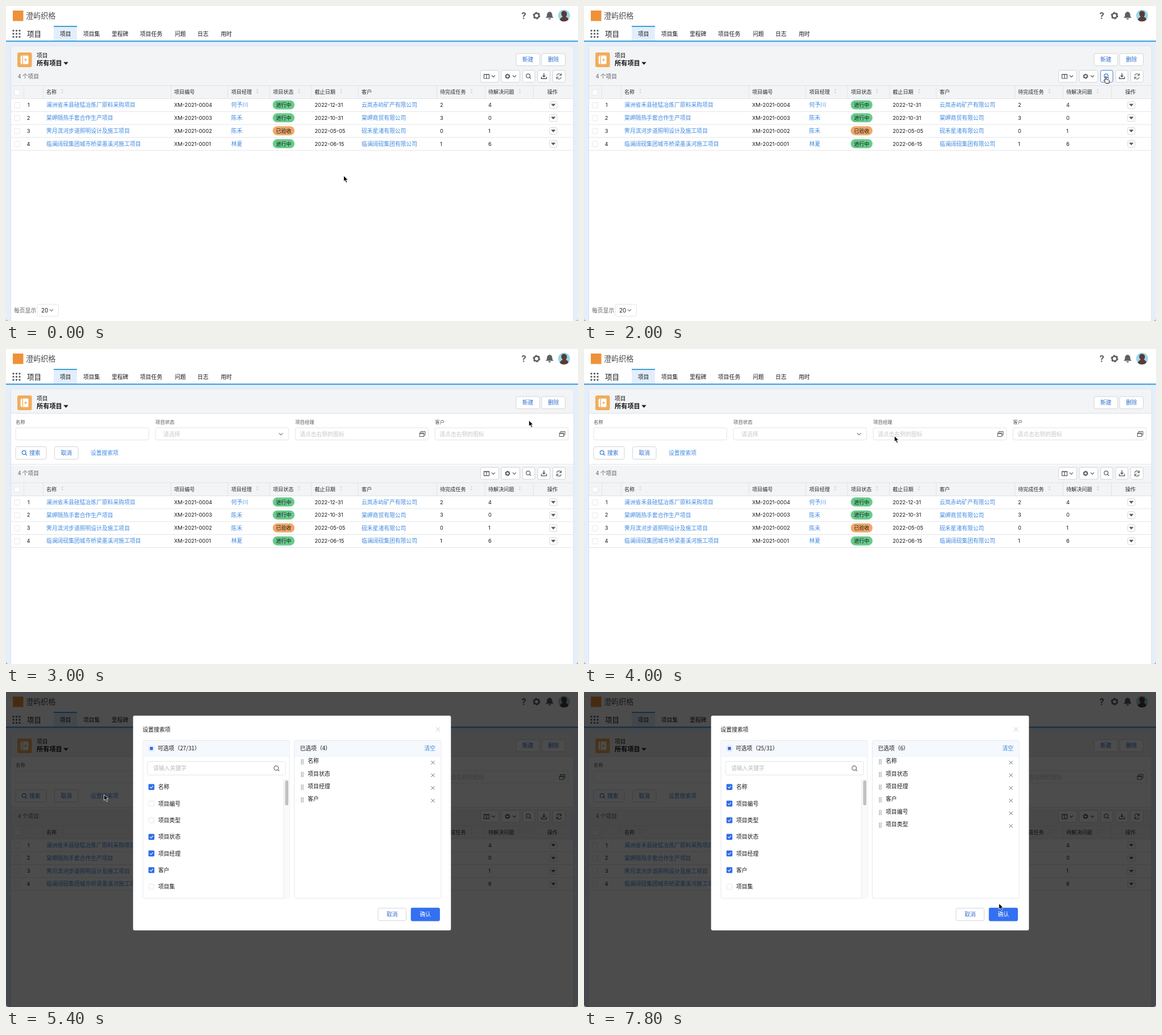
These frames come from a looping animation (1007x556 px, 8 s). An HTML page:

```html
<!DOCTYPE html>
<html lang="zh-CN">
<head>
<meta charset="utf-8">
<title>项目</title>
<style>
  html, body { margin: 0; width: 100%; height: 100%; overflow: hidden; background: #fff; }
  svg { display: block; width: 100vw; height: 100vh; }
  text { font-family: "Noto Sans CJK SC", "Noto Sans CJK", sans-serif; white-space: pre; }
  text.latin { font-family: Inter, "Liberation Sans", sans-serif; }
</style>
</head>
<body>
<svg id="stage" viewBox="0 0 1007 556" preserveAspectRatio="none"></svg>
<script>
const LINK = '#3f8ae0', BLUE = '#2f6fd0', INK = '#181818', LINE = '#dddfe2', GREY = '#585858';
const stage = document.getElementById('stage');

function add(parent, tag, attrs = {}) {
  const node = document.createElementNS('http://www.w3.org/2000/svg', tag);
  for (const key in attrs) node.setAttribute(key, attrs[key]);
  parent.appendChild(node);
  return node;
}
const group = (parent, attrs) => add(parent, 'g', attrs);
const rect = (parent, x, y, width, height, fill, more) =>
  add(parent, 'rect', { x, y, width, height, fill, ...more });
const path = (parent, d, stroke, width = 1, fill = 'none') =>
  add(parent, 'path', { d, stroke, 'stroke-width': width, fill });
const circle = (parent, cx, cy, r, fill, more) => add(parent, 'circle', { cx, cy, r, fill, ...more });
const show = (node, on) => node.setAttribute('display', on ? 'inline' : 'none');

// y is the middle of the line of text
function text(parent, x, y, value, { size = 9.8, fill = INK, weight = 400, anchor = 'start' } = {}) {
  const latin = /^[\x20-\x7e]+$/.test(value);
  const fontSize = latin ? size * 0.94 : size;
  const node = add(parent, 'text', {
    x, y: y + fontSize * 0.38, fill, 'font-size': fontSize, 'font-weight': weight, 'text-anchor': anchor
  });
  if (latin) node.setAttribute('class', 'latin');
  node.textContent = value;
  return node;
}

const frame = (parent, x, y, w, h, stroke = '#cfd1d4', fill = '#fff', rx = 2.8) =>
  rect(parent, x + .5, y + .5, w - 1, h - 1, fill, { stroke, 'stroke-width': .9, rx });

function button(parent, x, y, w, h, label) {
  frame(parent, x, y, w, h);
  text(parent, x + w / 2, y + h / 2, label, { fill: BLUE, anchor: 'middle' });
}
const chevron = (parent, x, y, color = '#555', r = 3) =>
  path(parent, `M${x - r} ${y - r / 2}l${r} ${r} ${r} ${-r}`, color, 1.1);
const cross = (parent, x, y, r, color) =>
  path(parent, `M${x - r} ${y - r}l${2 * r} ${2 * r}m0 ${-2 * r}l${-2 * r} ${2 * r}`, color, .9);
const caret = (parent, x, y, r, color = INK) =>
  path(parent, `M${x - r} ${y - r / 2}h${2 * r}l${-r} ${r * 1.15}z`, color, .5, color);

function lens(parent, x, y, color, r = 3.4) {
  const g = group(parent, { stroke: color, fill: 'none', 'stroke-width': 1.2 });
  circle(g, x - .8, y - .8, r, 'none');
  add(g, 'path', { d: `M${x + r * .7 - .8} ${y + r * .7 - .8}l2.7 2.7` });
}
function gear(parent, x, y, r, color, hole) {
  circle(parent, x, y, r, 'none', { stroke: color, 'stroke-width': r * .65 });
  circle(parent, x, y, r * 1.36, 'none', {
    stroke: color, 'stroke-width': r * .38, 'stroke-dasharray': `${r * .72} ${r * .704}`
  });
  circle(parent, x, y, r * .62, hole);
}
function checkbox(parent, x, y) {
  frame(parent, x - 5.2, y - 5.2, 10.4, 10.4, '#e2e4e8', '#fff', 1.4);
}
function tick(parent, x, y) {
  const g = group(parent);
  rect(g, x - 5.2, y - 5.2, 10.4, 10.4, '#2f6de8', { rx: 1.4 });
  path(g, `M${x - 2.7} ${y}l2 2 3.6 -3.9`, '#fff', 1.1);
  return g;
}

function drawTopBar(g) {
  rect(g, 0, 0, 1007, 556, '#e5effb');
  rect(g, 0, 0, 1007, 62, '#fff');
  rect(g, 12, 8, 18.5, 18.5, '#ef9138');
  text(g, 35, 17, '澄屿织格', { size: 13.1, fill: '#4a4a4a', weight: 500 });

  text(g, 911.5, 17, '?', { size: 16.5, fill: '#5c5f64', weight: 700, anchor: 'middle' });
  gear(g, 934, 17, 4.2, '#5c5f64', '#fff');
  path(g, 'M950.5 20.5c2-1.5 2-3 2.2-5.5c.3-6 8.3-6 8.6 0c.2 2.5.2 4 2.2 5.5z', '#5c5f64', .6, '#5c5f64');
  path(g, 'M954.6 21.8h4.8a2.4 2 0 0 1-4.8 0z', 'none', 0, '#5c5f64');
  circle(g, 982.5, 17, 10.5, '#9bd7e8');
  path(g, 'M975 24.4c1-4 4-4.4 5-5.4c-6-7 0-12 4-10c5 1 4 8 1.5 10c2 1 4.5 2 4.5 5a10.5 10.5 0 0 1-15 .4z', 'none', 0, '#5a3a38');

  for (let i = 0; i < 9; i++) circle(g, 13 + i % 3 * 5.5, 43.5 + Math.floor(i / 3) * 5.5, 1.7, '#5f6368');
  text(g, 37, 49, '项目', { size: 12.6 });
  rect(g, 84, 35, 41, 26, '#e2eefb');
  rect(g, 84, 35, 41, 2, '#3f9fd6');
  [[95, '项目'], [136, '项目集'], [186, '里程碑'], [236, '项目任务'], [297, '问题'], [337, '日志'], [378, '用时']]
    .forEach(([x, label]) => text(g, x, 49, label));
  rect(g, 0, 61, 1007, 2.2, '#46a2d9');
}

function drawPanel(g) {
  rect(g, 8.5, 71, 990.5, 490, '#fff', { rx: 3, stroke: '#d6dbe2', 'stroke-width': .8 });
  rect(g, 9, 71.5, 989.5, 80, '#f2f4f6', { rx: 3 });
  rect(g, 20, 82, 25.5, 26, '#f0ad5b', { rx: 3 });
  rect(g, 26, 87.5, 13.5, 15, '#fff', { rx: 1.5 });
  rect(g, 28.6, 87.5, 1.3, 15, '#f0ad5b');
  path(g, 'M34.5 92l.9 2h2l-1.6 1.3.6 2-1.9-1.2-1.9 1.2.6-2-1.6-1.3h2z', 'none', 0, '#f0ad5b');
  path(g, 'M24.5 91h2.5M24.5 95h2.5M24.5 99h2.5', '#fff', 1);
  text(g, 54, 87, '项目');
  text(g, 54, 101, '所有项目', { size: 11.2, weight: 700 });
  caret(g, 105.5, 101, 3.7);
  button(g, 897.5, 83.5, 42.5, 22.5, '新建');
  button(g, 942.5, 83.5, 42.5, 22.5, '删除');
}

function drawSearchForm(g) {
  rect(g, 9, 114, 989.5, 90, '#fff');
  rect(g, 9, 113.2, 989.5, .9, LINE);
  rect(g, 9, 203, 989.5, .9, LINE);
  ['名称', '项目状态', '项目经理', '客户'].forEach((label, i) => {
    const x = 17 + i * 246.1;
    text(g, x, 129, label, { size: 8.4, fill: '#555' });
    frame(g, x - .5, 138.5, 235.5, 22.5, '#dfe1e5');
    if (i === 1) {
      text(g, x + 14, 150, '请选择', { fill: '#c4c7cc' });
      chevron(g, x + 221, 150, '#777', 3.4);
    } else if (i > 1) {
      text(g, x + 8, 150, '请点击右侧的图标', { fill: '#c4c7cc' });
      const ix = x + 219;
      path(g, `M${ix} 148h7.5v6.5h-7.5zM${ix} 149.5h7.5M${ix + 2} 147.5v-2h7.7v6.5h-2`, '#555', 1);
    }
  });
  frame(g, 16.5, 172, 55, 23);
  lens(g, 32.5, 183.5, BLUE);
  text(g, 41, 183.5, '搜索', { fill: BLUE });
  button(g, 85, 172, 42.5, 23, '取消');
  return text(g, 149, 183.5, '设置搜索项', { fill: LINK });
}

function drawTable(g) {
  rect(g, 9, 110, 989.5, 54, '#f2f4f6');
  text(g, 21, 124, '4 个项目', { fill: '#5d6065' });

  [[835, 33], [871.5, 33.5], [909, 22.5], [935.5, 22.5], [962, 23]].forEach(([x, w]) => frame(g, x, 113, w, 22));
  path(g, 'M841.5 120.5h9v7.5h-9zM841.5 121h9M846 120v8', GREY, 1.2);
  chevron(g, 858, 124);
  gear(g, 883, 124, 2.9, GREY, '#fff');
  chevron(g, 895, 124);
  lens(g, 920, 124, GREY);
  path(g, 'M947 118.5v6M942.5 125v3.3h9v-3.3', GREY, 1.4);
  path(g, 'M943.8 122.8h6.4l-3.2 3.4z', 'none', 0, GREY);
  path(g, 'M969.5 123a4 4 0 0 1 7-2l1 1.5M977.5 119v3.5h-3.3M977.5 125.5a4 4 0 0 1-7 2l-1-1.5M969.5 129v-3.5h3.3', GREY, 1.1);
  const hover = group(g);
  frame(hover, 909, 113, 22.5, 22, '#3c78d0');
  lens(hover, 920, 124, BLUE);

  rect(g, 9, 140, 989.5, .9, LINE);
  rect(g, 9, 163, 989.5, .9, LINE);
  [31, 65, 290, 390, 463.5, 537.5, 619.5, 758, 843, 928].forEach(x => rect(g, x, 140, .8, 23, LINE));
  checkbox(g, 19.5, 152.5);
  [[71, '名称', 99], [296, '项目编号'], [396.5, '项目经理', 442.5], [470, '项目状态', 516], [543.5, '截止日期', 590],
   [626, '客户'], [764, '待完成任务', 819.5], [849, '待解决问题', 904.5], [953, '操作']].forEach(([x, label, sort]) => {
    text(g, x, 152, label, { size: 9.1, fill: '#2b2b2b' });
    if (sort) path(g, `M${sort - 2.2} 149l2.2-2.7 2.2 2.7zM${sort - 2.2} 151.5l2.2 2.7 2.2-2.7z`, 'none', 0, '#d3d6da');
  });

  const rows = [
    ['澜洲省禾县硅锰冶炼厂原料采购项目', '何予川', '2022-12-31', '云岚赤屿矿产有限公司', '2', '4'],
    ['棠岬隔热手套合作生产项目', '陈禾', '2022-10-31', '棠岬商贸有限公司', '3', '0'],
    ['霁月滨河步道照明设计及施工项目', '陈禾', '2022-05-05', '砚禾星渚有限公司', '0', '1'],
    ['临澜阔砚集团城市桥梁墨溪河施工项目', '林夏', '2022-06-15', '临澜阔砚集团有限公司', '1', '6']
  ];
  rows.forEach(([name, manager, due, client, tasks, issues], i) => {
    const y = 174.5 + i * 22.85, done = i === 2, link = { fill: LINK };
    rect(g, 9, y + 11.4, 989.5, .8, LINE);
    checkbox(g, 19.5, y + .7);
    text(g, 39.5, y, String(i + 1), { anchor: 'middle' });
    text(g, 71, y, name, link);
    text(g, 296, y, 'XM-2021-000' + (4 - i));
    text(g, 396.5, y, manager, link);
    rect(g, 469.5, y - 8, 38.5, 16, done ? '#efa869' : '#68cb8c', { rx: 8 });
    text(g, 488.8, y, done ? '已验收' : '进行中', { size: 9.1, anchor: 'middle' });
    text(g, 543.5, y, due);
    text(g, 626, y, client, link);
    text(g, 764, y, tasks);
    text(g, 849, y, issues);
    frame(g, 956.5, y - 6.5, 14, 13.5, '#cfd1d4');
    caret(g, 963.5, y + .2, 3.6, GREY);
  });
  return hover;
}

function drawPager(g) {
  text(g, 14, 537, '每页显示', { fill: '#5d6065' });
  frame(g, 54.5, 526, 38.5, 22, '#dfe1e5');
  text(g, 62, 537, '20', { size: 10.6 });
  chevron(g, 80, 537, '#777', 3);
}

function drawDialog(g) {
  const FIRST = 167.7, STEP = 29.33;
  rect(g, 223.7, 41.7, 559.6, 379, '#fff', { rx: 3 });
  text(g, 240.5, 66, '设置搜索项', { weight: 500 });
  cross(g, 760.5, 66, 3.8, '#bfc2c7');

  for (const [x, w] of [[240.5, 259], [507, 259.5]]) {
    frame(g, x, 85, w, 279.5, '#e3e6ea', '#fff', 2);
    rect(g, x + 1, 86, w - 2, 27.5, '#f5f8fc');
    rect(g, x + 1, 113, w - 2, .7, '#eceef2');
  }
  frame(g, 250.8, 94.3, 10.4, 10.4, '#d5dff2', '#fff', 1.4);
  rect(g, 253.2, 96.8, 5.6, 5.6, '#2f6de8', { rx: .6 });
  const available = text(g, 267, 99, '');
  frame(g, 248.5, 122, 244, 25, '#dfe1e5');
  text(g, 259, 134.5, '请输入关键字', { fill: '#b5b8bd' });
  lens(g, 476.5, 135, '#666', 3.9);

  const ticks = ['名称', '项目编号', '项目类型', '项目状态', '项目经理', '客户', '项目集'].map((label, i) => {
    const y = FIRST + i * STEP;
    checkbox(g, 256, y);
    text(g, 268, y, label);
    const mark = tick(g, 256, y);
    show(mark, i > 2 && i < 6 || i === 0);
    return mark;
  });
  rect(g, 488.8, 153.5, 10, 210.5, '#fafafa');
  rect(g, 488.5, 153.5, .8, 210.5, '#e4e4e4');
  rect(g, 491.4, 156, 5.7, 44, '#c1c1c1', { rx: 2.8 });

  const chosen = text(g, 517.5, 99, '');
  text(g, 736.5, 99, '清空', { fill: LINK });
  const items = ['名称', '项目状态', '项目经理', '客户', '项目编号', '项目类型'].map((label, i) => {
    const item = group(g), y = 121.6 + i * 22.38;
    for (let k = 0; k < 8; k++) rect(item, 519.5 + k % 2 * 2.8, y - 2.6 + (k >> 1) * 2.4, 1.3, 1.3, '#666');
    text(item, 531.3, y, label);
    cross(item, 751.5, y + 3, 3, '#555');
    return item;
  });
  button(g, 654.5, 381, 50.5, 23, '取消');
  rect(g, 712.7, 380.8, 51.2, 23.6, '#3370f2', { rx: 2.8 });
  text(g, 738.2, 392.5, '确认', { fill: '#fff', anchor: 'middle' });

  return extra => {
    available.textContent = `可选项（${27 - extra}/31）`;
    chosen.textContent = `已选项（${4 + extra}）`;
    show(ticks[1], extra > 0);
    show(ticks[2], extra > 1);
    items.forEach((item, i) => show(item, i < 4 + extra));
  };
}

const topBar = group(stage), panel = group(stage), form = group(stage), table = group(stage), pager = group(stage);
drawTopBar(topBar);
drawPanel(panel);
const formLink = drawSearchForm(form);
const searchHover = drawTable(table);
drawPager(pager);
const shade = rect(stage, 0, 0, 1007, 556, '#000');
// rounded window corners
path(stage, 'M0 551a5 5 0 0 0 5 5h-5zM1007 551a5 5 0 0 1-5 5h5z', 'none', 0, '#b9aa9c');
const glimmer = rect(stage, 557, 31, 14, 6, '#dfeaf8');
const dialog = group(stage);
const setChosen = drawDialog(dialog);
const cursor = group(stage);
const arrow = path(cursor, 'M0 0v10.3l2.4-2.2 1.9 4.3 1.9-.8-1.9-4.2h3.3z', '#fff', .8, '#000');
const hand = path(cursor, 'M-1 .5c0-1.7 2.1-1.7 2.1 0v4l3.9.9c1.2.3 1.5 1.1 1.3 2.2l-.7 3.9h-5.2l-3.3-4.5c-.8-1.2.5-2 1.3-1.3l.6.6z', '#000', .9, '#fff');

const LOOP = 8000, STEP_MS = 200, OPEN = 2600, DIALOG = 5400;
const moves = [
  [0, 594.5, 299.5], [1500, 918.5, 125], [2400, 918.5, 125], [2600, 920.5, 126], [3400, 920.5, 126],
  [4600, 172.5, 181], [5400, 172.5, 181], [6000, 205.5, 188], [6200, 255, 196], [6400, 255, 196],
  [6800, 255, 225], [7000, 255, 225], [7800, 730.5, 373.3], [8000, 730.5, 373.3]
];

function cursorAt(t) {
  const i = moves.findIndex((m, k) => k > 0 && t <= m[0]);
  const [t0, x0, y0] = moves[i - 1], [t1, x1, y1] = moves[i];
  const p = (t - t0) / (t1 - t0), e = p * p * (3 - 2 * p);
  return [x0 + (x1 - x0) * e, y0 + (y1 - y0) * e];
}

function render(t) {
  const open = t >= OPEN, modal = t >= DIALOG;
  const onSearch = t >= 1400 && !open, onCheck = t >= 6200 && t <= 7000;
  show(form, open);
  show(pager, !open);
  table.setAttribute('transform', `translate(0 ${open ? 95.6 : 0})`);
  show(searchHover, onSearch);
  formLink.setAttribute('fill', t >= 4600 && !modal ? '#2361b8' : LINK);
  shade.setAttribute('opacity', modal ? .7 : t >= 5200 ? .02 : 0);
  show(glimmer, t >= 5200 && !modal);
  show(dialog, modal);
  setChosen(t >= 6800 ? 2 : t >= 6400 ? 1 : 0);
  const [x, y] = cursorAt(t);
  cursor.setAttribute('transform', `translate(${x} ${y})`);
  show(arrow, !onSearch && !onCheck);
  show(hand, onSearch || onCheck);
}

const start = performance.now();
function nextFrame() {
  const t = (performance.now() - start) % LOOP;
  render(Math.floor(t / STEP_MS) * STEP_MS);
  requestAnimationFrame(nextFrame);
}
render(0);
requestAnimationFrame(nextFrame);
</script>
</body>
</html>
```
